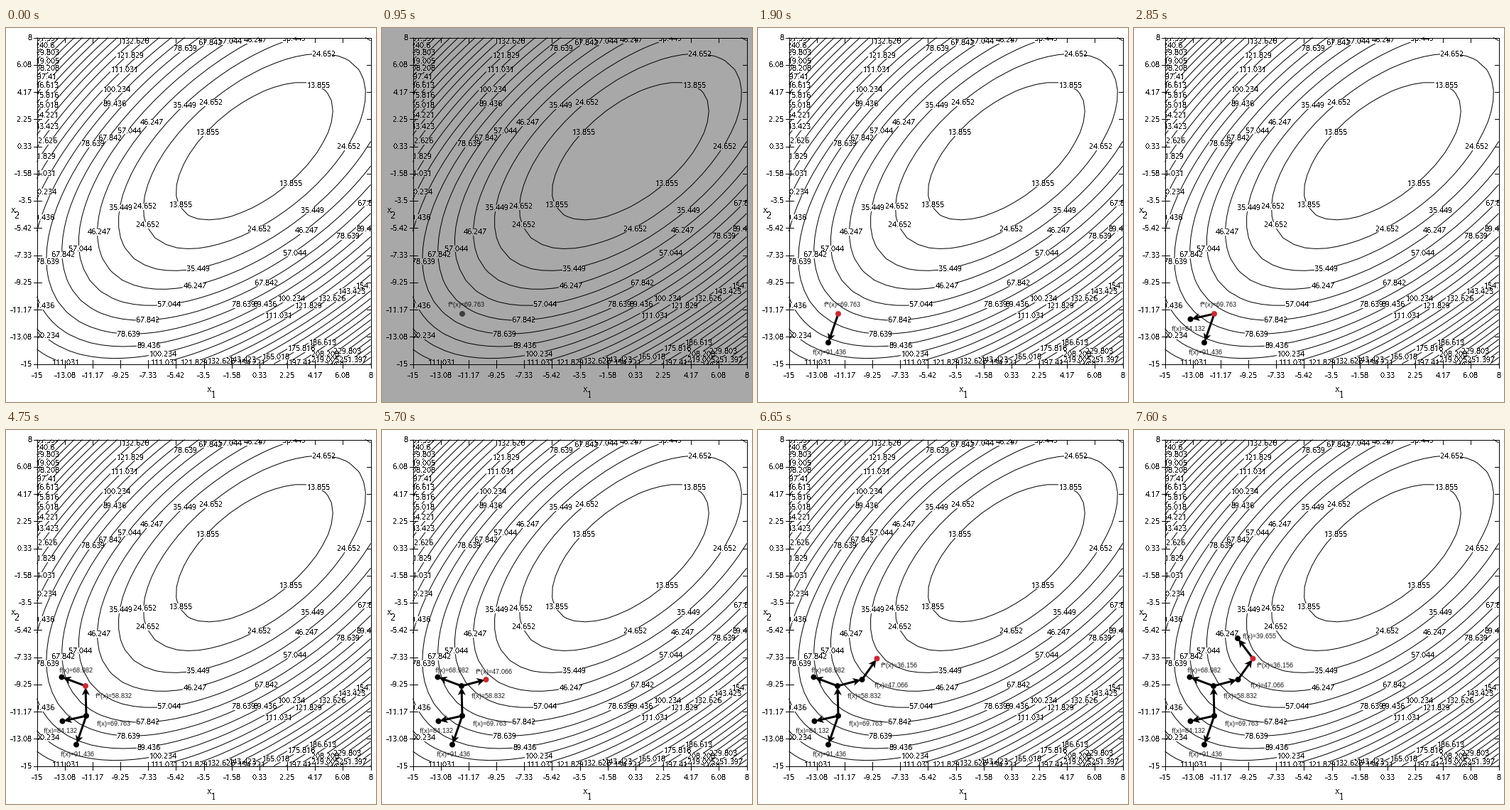
Animation, 521 px wide and 526 px high, one loop 8 s. Source, as a matplotlib script:

```python
import numpy as np
import matplotlib.pyplot as plt
from matplotlib.animation import FuncAnimation
from matplotlib.patches import Circle, Polygon, Rectangle

W, H, DPI = 521, 526, 100
PX = 72 / DPI                          # points per pixel
LEFT, RIGHT, TOP, BOTTOM = 43, 513, 13, 472
LO, HI = -15, 8
STEP_MS, TICK_MS, LOOP_MS = 950, 50, 8000
RED, DIM = "#cb2936", "#3c3c3c"

plt.rcParams.update({"font.family": "Liberation Serif",
                     "text.antialiased": False,
                     "text.hinting": "native",
                     "text.hinting_factor": 1})
fig = plt.figure(figsize=(W / DPI, H / DPI), dpi=DPI, facecolor="white")
ax = fig.add_axes([0, 0, 1, 1])
ax.set_xlim(-0.5, W - 0.5)
ax.set_ylim(H - 0.5, -0.5)
ax.axis("off")
plot_area = Rectangle((LEFT, TOP), RIGHT - LEFT, BOTTOM - TOP,
                      fill=False, lw=PX, ec="black", zorder=4)
ax.add_patch(plot_area)


def bowl(px, py):
    """Height of a rotated quadratic bowl at a pixel position."""
    x = LO + (px - LEFT) * (HI - LO) / (RIGHT - LEFT)
    y = LO + (BOTTOM - py) * (HI - LO) / (BOTTOM - TOP)
    return 0.563 * x**2 - 0.74 * x * y + 0.698 * y**2 + 3.1


def line(x, y):
    ax.plot(x, y, color="black", lw=PX, zorder=4)


def write(x, y, s, size, **kw):
    return ax.text(x, y, s, fontsize=size * PX, **kw)


levels = 13.8546 + 10.7974 * np.arange(26)
gx, gy = np.meshgrid(np.linspace(LEFT, RIGHT, 32), np.linspace(TOP, BOTTOM, 32))
ax.contour(gx, gy, bowl(gx, gy), levels=levels, colors="black",
           linewidths=PX, zorder=1)

# Contours are labelled wherever they cross one of these polylines
GUIDES = [
    [(436, 86), (446, 28)],
    [(280, 156), (287, 96)],
    [(252, 242), (189, 282)],
    [(201, 249), (184, 252)],
    [(403, 211), (349, 288)],
    [(474, 166), (494, 166)],
    [(259, 104), (203, 132), (115, 164)],
    [(163, 249), (124, 291), (101, 310), (50, 330)],
    [(269, 330), (263, 362), (163, 435)],
    [(190, 441), (224, 461)],
    [(430, 252), (419, 288), (402, 319), (330, 391)],
    [(356, 389), (410, 378)],
    [(374, 406), (513, 360)],
    [(370, 464), (457, 437)],
    [(408, 472), (461, 452)],
    [(443, 468), (494, 448)],
    [(460, 475), (500, 461)],
    [(149, 111), (152, 86), (164, 58), (180, 14)],
    [(245, 30), (287, 19), (418, 14)],
    [(476, 293), (513, 281)],
    [(508, 246), (520, 241)],
    [(53, 12), (51, 140), (47, 185), (49, 272)],
    [(48, 385), (53, 434), (84, 476)],
    [(206, 470), (264, 471), (335, 465), (345, 471)],
]


def crossings(path):
    """Yield (level index, x, y) for each contour met along the path."""
    knots = np.linspace(0, 1, len(path))
    t = np.linspace(0, 1, 600)
    x, y = (np.interp(t, knots, axis) for axis in zip(*path))
    band = np.searchsorted(levels, bowl(x, y))
    for i in np.flatnonzero(np.diff(band)):
        yield min(band[i], band[i + 1]), x[i], y[i]


def contour_label(k, x, y):
    s = f"{levels[k]:.3f}".rstrip("0")
    w = 5 * len(s) - 2
    left, base = round(x - w / 2), round(y + 3.5)
    gap = Rectangle((left - 0.5, base - 8), w, 9, color="white", lw=0, zorder=2)
    ax.add_patch(gap)
    gap.set_clip_path(plot_area)
    text = write(left, base, s, 10.6, zorder=3, clip_on=True)
    text.set_clip_path(plot_area)


for guide in GUIDES:
    for k, x, y in crossings(guide):
        contour_label(k, x, y)

# Frame ticks and axis names
for i, v in enumerate(np.linspace(LO, HI, 13)):
    x = LEFT + i * (RIGHT - LEFT) / 12
    y = BOTTOM - i * (BOTTOM - TOP) / 12
    s = f"{v:.2f}".rstrip("0").rstrip(".")
    write(x, 491.5, s, 10.6, ha="center")
    write(36, y + 3.5, s, 10.6, ha="right")
    line([x, x], [BOTTOM - 6, BOTTOM + 5])
    line([x, x], [TOP, TOP + 6])
    line([LEFT - 5, LEFT + 6], [y, y])
    line([RIGHT - 6, RIGHT], [y, y])
for x, y, sub in [(282, 512, "1"), (6, 260, "2")]:
    write(x, y, "x", 14)
    write(x + 6, y + 7, sub, 14)

veil = Rectangle((-1, -1), W + 1, H + 1, color="black", alpha=0.34, lw=0, zorder=5)
ax.add_patch(veil)


class Node:
    """A visited point with its arrow from the parent and its value label."""

    def __init__(self, pos, value, spot, parent=None, moved=None, move_at=99):
        self.pos, self.value, self.spot = np.array(pos, float), value, spot
        self.moved, self.move_at = moved, move_at
        self.dot = Circle(pos, 4, lw=0, zorder=8)
        ax.add_patch(self.dot)
        self.label = write(0, 0, "", 8.7, family="Liberation Sans",
                           color="#111111", zorder=9, antialiased=True)
        self.parts = [self.dot, self.label]
        if parent:
            self.add_arrow(parent.pos)

    def add_arrow(self, start):
        d = (self.pos - start) / np.hypot(*(self.pos - start))
        n = np.array([-d[1], d[0]])
        tip = self.pos - 2 * d
        neck = tip - 8 * d
        shaft, = ax.plot(*zip(start, neck), color="black", lw=3 * PX, zorder=6)
        head = Polygon([tip, tip - 11 * d + 5.5 * n, neck, tip - 11 * d - 5.5 * n],
                       color="black", lw=0, zorder=7)
        ax.add_patch(head)
        self.parts += [shaft, head]

    def show(self, visible, best, stage):
        for p in self.parts:
            p.set_visible(visible)
        x, y = self.moved if stage >= self.move_at else self.spot
        self.label.set_position((x, y + 3))
        self.label.set_text(f"f{'*' if best else ''}(x)={self.value:.3f}")
        self.dot.set_color(DIM if stage == 1 else RED if best else "black")


a = Node((112.5, 401.5), 69.763, (92, 388), moved=(127, 412), move_at=4)
b = Node((98.5, 442), 91.436, (76.5, 455.5), a)
c = Node((79, 409), 84.132, (52, 423), a)
d = Node((111.5, 359.5), 58.832, (87, 347.5), a, (125, 373.5), 5)
e = Node((78, 347), 68.982, (74, 337.5), d)
f = Node((146, 350.5), 47.066, (131, 339.5), d, (163, 359), 7)
g = Node((167, 321), 36.156, (172, 331), f)
h = Node((145.5, 292.5), 39.655, (152, 289.5), g)
nodes = [a, b, c, d, e, f, g, h]


def update(i):
    stage = i * TICK_MS // STEP_MS     # one more node per stage
    seen = nodes[:stage]
    best = min(seen, key=lambda node: node.value, default=None)
    veil.set_visible(stage == 1)
    for node in nodes:
        node.show(node in seen, node is best, stage)
    return []


anim = FuncAnimation(fig, update, frames=LOOP_MS // TICK_MS, interval=TICK_MS,
                     init_func=lambda: update(0), repeat=True, repeat_delay=0)
plt.show()
```
